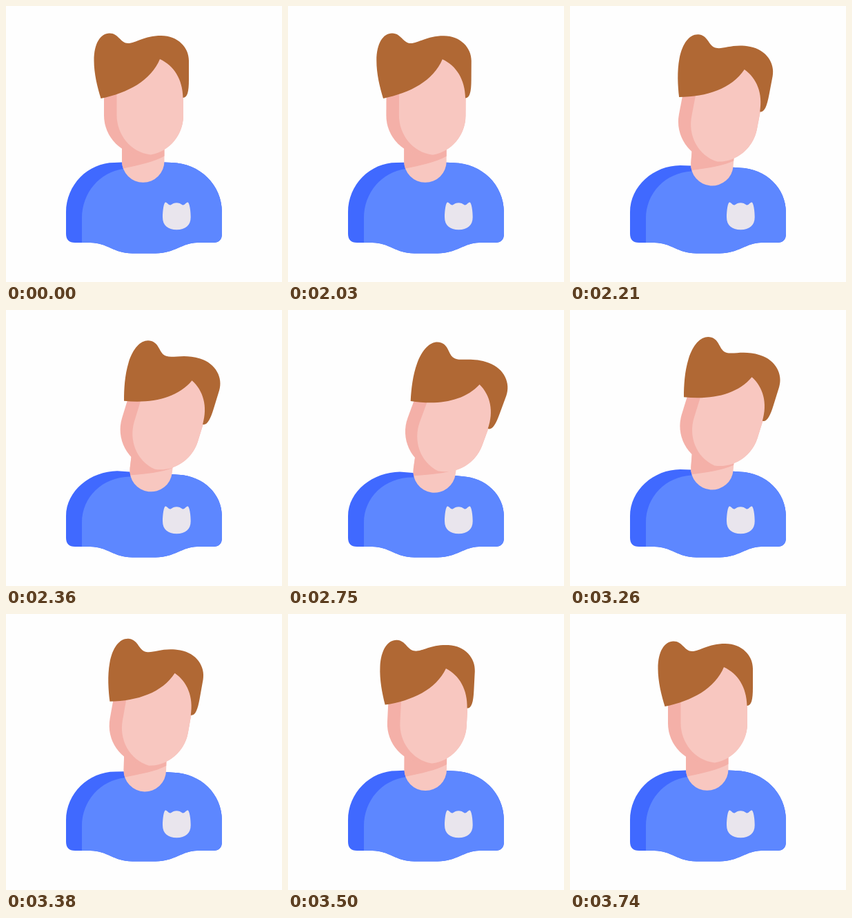
Recreate the animation shown at these times as an HTML page. Size 400 by 400 pixels, loop 3.77 s.

```html
<!DOCTYPE html>
<html lang="en">
<head>
<meta charset="utf-8">
<title>Head tilt</title>
<style>
  html, body { margin: 0; width: 100%; height: 100%; overflow: hidden; background: #fefefe; }
  svg { display: block; width: 100vw; height: 100vh; }
</style>
</head>
<body>
<svg viewBox="0 0 400 400">
  <path id="torso" fill="#4069ff"/>
  <path id="shirt" fill="#5d87ff"/>
  <path fill="#e9e5ed" d="M231 284.6C233 283.8 235.5 289 238.5 288.5C244 284 250.500 284 256 288.500C259 289 261.500 283.800 263.500 284.600C266 285.600 267.700 297 267.700 306C267.700 318 260 324.200 247.400 324.200C234.500 324.200 227 318 227 306C227 297 228.500 285.600 231 284.600Z"/>
  <g id="neck">
    <path fill="#f8c7c0" d="M168 190H229.500V225A30.750 30.750 0 0 1 168 225Z"/>
    <path fill="#f4b0a8" d="M168 190H229.500V217.500C215 226 191 231 169.800 235.500Q168 230 168 225Z"/>
  </g>
  <g id="head">
    <path fill="#f4b0a8" d="M142 112H257V158.500A57.500 57.500 0 0 1 142 158.500Z"/>
    <path fill="#f8c7c0" d="M160.500 110L223 76C243 83 257 106 257 133V158.500C257 187 237 211 209.500 215.500C180 212 160.500 186 160.500 158Z"/>
    <path fill="#b06834" d="M137.500 134C132.500 118 127.500 98 127.500 79C127.500 54 137 39.500 150 39.500C163 39.500 166 54 177 54C188 54 200 43 225 43C249 43 265 60 265 79V107C265 124 263 133 256.500 133C256 106 243 86 223 77C210 108 177 126 137.500 134Z"/>
  </g>
</svg>
<script>
const LOOP = 3770;
const byId = id => document.getElementById(id);
const torso = byId('torso'), shirt = byId('shirt'), neck = byId('neck'), head = byId('head');
const hem = 'V330Q313 343 300 343H277C256 343 244 358.500 217 358.500H183C156 358.500 147 343 122 343H';

const phase = (t, from, to) => Math.min(1, Math.max(0, (t - from) / (to - from)));
const cubicInOut = u => u < .5 ? 4 * u ** 3 : 1 - 4 * (1 - u) ** 3;

// Cubic Bezier easing with handles (a, 0) and (b, 1)
function bezier(u, a, b) {
  let lo = 0, hi = 1;
  for (let i = 0; i < 24; i++) {
    const s = (lo + hi) / 2, r = 1 - s;
    if (3 * r * r * s * a + 3 * r * s * s * b + s ** 3 < u) lo = s; else hi = s;
  }
  return lo * lo * (3 - 2 * lo);
}

function draw(t) {
  const lean = bezier(phase(t, 2000, 2640), .25, .25);
  const shift = lean - cubicInOut(phase(t, 2868, 3673));
  const tilt = 20.2 * (lean - cubicInOut(phase(t, 3030, 3732)));
  // Point that slides with the shoulders
  const pt = (x, y, dx, dy) => `${x + dx * shift} ${y + dy * shift} `;

  const rightSide = 'L' + pt(229, 226.5, 13, 13.5) + 'L' + pt(240, 227, 12, 14) +
    'C' + pt(281, 228, 6, 15) + pt(313, 259, 0, 9) + '313 299' + hem;
  torso.setAttribute('d', 'M87 299C' + pt(87, 259, 0, 3) + pt(119, 227, 5, 8) +
    pt(157, 227, 5, 7.5) + 'L' + pt(168, 226.5, 13, 9.5) + rightSide + '100Q87 343 87 330Z');
  shirt.setAttribute('d', 'M110 343V308C' + pt(110, 270, 0, 2) + pt(136, 241, 4, 1) +
    pt(170, 236, 12, 6.5) + rightSide + '110Z');

  neck.setAttribute('transform',
    `translate(${13.5 * shift} ${9 * shift}) rotate(${8 * shift} 198.75 225)`);
  head.setAttribute('transform',
    `translate(${20.4 * shift} ${17 * shift}) rotate(${tilt} 201 180)`);
}

const start = performance.now();
function tick() {
  draw((performance.now() - start) % LOOP);
  requestAnimationFrame(tick);
}
tick();
</script>
</body>
</html>
```
